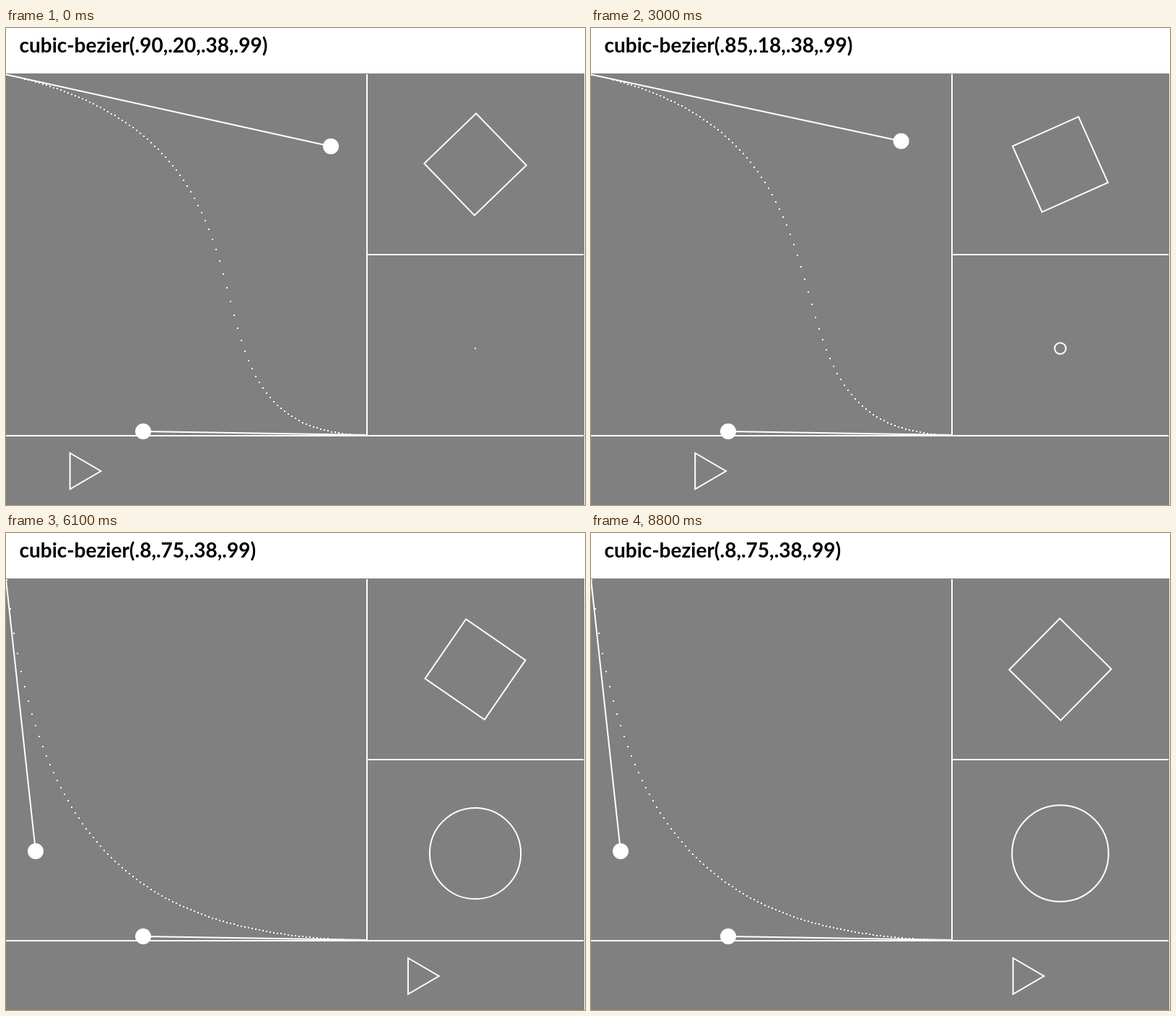
Recreate the animation shown at these times as an HTML page with a canvas. Size 802x661 px, loop 8900 ms.

```html
<!DOCTYPE html>
<html lang="en">
<head>
<meta charset="utf-8">
<title>Bezier easing editor</title>
<style>
  html, body { margin: 0; width: 100%; height: 100%; overflow: hidden; background: #fff; }
  canvas { display: block; }
</style>
</head>
<body>
<canvas width="802" height="661"></canvas>
<script>
const ctx = document.querySelector('canvas').getContext('2d');
const LOOP = 8900, SWEEP = 1800;
const TOP = 64, SIZE = 500;
const DRAG_START = 2930, DRAG_END = 3600, STYLE_LAG = 100;
const END_HANDLE = [190, 559];

const clamp = v => Math.min(1, Math.max(0, v));
const smooth = p => p * p * (3 - 2 * p);
const cubic = (a, b, t) => 3 * a * t * (1 - t) ** 2 + 3 * b * t * t * (1 - t) + t ** 3;
const unit = ([x, y]) => [x / SIZE, (y - TOP) / SIZE];

// The first handle is dragged along a curved path.
function startHandle(time) {
  const u = smooth(clamp((time - DRAG_START) / (DRAG_END - DRAG_START)));
  const quad = (a, b, c) => (1 - u) ** 2 * a + 2 * u * (1 - u) * b + u * u * c;
  return [quad(450, 120, 41), quad(164, 40, 441)];
}

function ease(handle, x) {
  const [x1, y1] = unit(handle), [x2, y2] = unit(END_HANDLE);
  let low = 0, high = 1;
  for (let i = 0; i < 30; i++) {
    const mid = (low + high) / 2;
    if (cubic(x1, x2, mid) < x) low = mid; else high = mid;
  }
  return cubic(y1, y2, low);
}

function progressAt(time) {
  const offset = time < SWEEP ? 40 : 52;
  const phase = ((time + offset) / SWEEP) % 2;
  return ease(startHandle(time - STYLE_LAG), phase < 1 ? phase : 2 - phase);
}

function path(points, closed) {
  ctx.beginPath();
  points.forEach(p => ctx.lineTo(...p));
  if (closed) ctx.closePath();
  ctx.stroke();
}

function disc([x, y], r, method) {
  ctx.beginPath();
  ctx.arc(x, y, r, 0, 2 * Math.PI);
  ctx[method]();
}

function drawEditor(handle) {
  path([[0, TOP + 0.5], handle]);
  path([[SIZE, TOP + SIZE], END_HANDLE]);
  for (let i = 0; i < 100; i++)
    ctx.fillRect(5 * i, Math.floor(TOP + SIZE * ease(handle, i / 100)), 2, 2);
  disc(handle, 11, 'fill');
  disc(END_HANDLE, 11, 'fill');
}

function drawShapes(progress) {
  ctx.save();
  ctx.translate(650, 189);
  ctx.rotate(Math.PI * (0.25 + progress));
  ctx.strokeRect(-50, -50, 100, 100);
  ctx.restore();

  disc([650, 444], 67 * progress, 'stroke');

  const x = 86 + SIZE * progress;
  path([[x, 589], [x + 42.8, 614], [x, 639]], true);
}

function drawLabel(handle) {
  const values = [handle, END_HANDLE].flatMap(([x, y]) => [x, y - TOP])
    .map(v => '.' + Math.floor(v / 5 + 1e-6));
  ctx.fillStyle = '#000';
  ctx.font = 'bold 28px Lato, sans-serif';
  ctx.fillText(`cubic-bezier(${values})`, 18.5, 34);
}

function draw(time) {
  const handle = startHandle(time);
  ctx.fillStyle = '#fff';
  ctx.fillRect(0, 0, 802, 661);
  ctx.fillStyle = '#808080';
  ctx.fillRect(0, 63, 801, 598);

  ctx.fillStyle = ctx.strokeStyle = '#fff';
  ctx.lineWidth = 2;
  path([[0, 565], [800, 565]]);
  path([[500, TOP], [500, 565]]);
  path([[500, 314], [800, 314]]);
  drawEditor(handle);
  drawShapes(progressAt(time));
  drawLabel(handle);
}

const start = performance.now();
function tick() {
  draw((performance.now() - start) % LOOP);
  requestAnimationFrame(tick);
}
tick();
</script>
</body>
</html>
```
